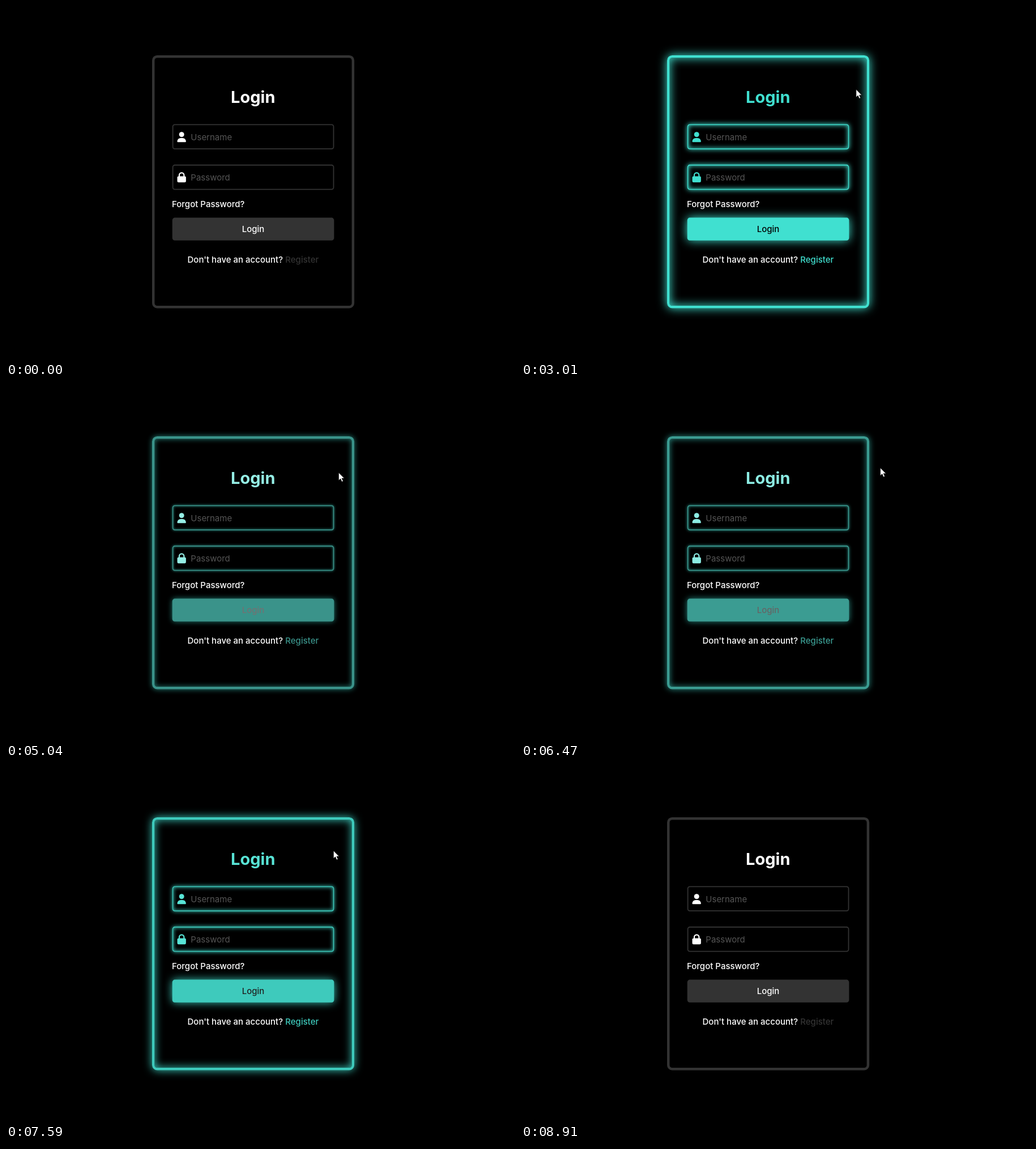
These frames come from a looping animation (899 px wide and 623 px high, 9.41 s). An HTML page:

```html
<!DOCTYPE html>
<html lang="en">
<head>
<meta charset="utf-8">
<title>Glowing login form</title>
<style>
  html, body { margin: 0; width: 100%; height: 100%; overflow: hidden; background: #000; }
  #card, #card div { position: absolute; box-sizing: border-box; }
  #card {
    left: 258px; top: 87.1px; width: 400px; height: 500px;
    transform: scale(.8929); transform-origin: 0 0;
    border: 5px solid var(--line); border-radius: 10px;
    box-shadow: 0 0 var(--wide) var(--glow), inset 0 0 var(--wide) var(--glow);
  }
  #card div { left: 35px; width: 320px; border-radius: 5px; }
  #card .field {
    height: 50px; border: 2px solid var(--line);
    box-shadow: 0 0 var(--narrow) var(--glow), inset 0 0 var(--narrow) var(--glow);
  }
  #card .button {
    top: 316px; height: 45px; background: var(--line);
    box-shadow: 0 0 var(--wide) var(--glow);
  }
  svg { position: absolute; left: 0; top: 0; }
  text { font: 500 15px Inter, sans-serif; fill: #fff; }
  .title { font-size: 29px; font-weight: 700; fill: var(--ink); }
  .hint { font-weight: 400; fill: #555; }
  .label { fill: var(--label); }
  .link { fill: var(--line); }
  .middle { text-anchor: middle; }
  .icon { fill: var(--ink); }
</style>
</head>
<body>
<div id="card">
  <div class="field" style="top:131px"></div>
  <div class="field" style="top:211px"></div>
  <div class="button"></div>
</div>
<svg width="899" height="623" viewBox="0 0 899 623">
  <text class="title middle" x="436.3" y="171">Login</text>
  <text class="hint" x="326.3" y="237">Username</text>
  <text class="hint" x="326.3" y="308">Password</text>
  <text x="293" y="354.5">Forgot Password?</text>
  <text class="label middle" x="436.5" y="399.3">Login</text>
  <text x="320.5" y="452.8">Don't have an account?</text>
  <text class="link" x="493.3" y="452.8">Register</text>

  <g class="icon">
    <circle cx="310.2" cy="226.7" r="4.5"/>
    <path d="M302.5 239.3c0-3.5 2.7-6.3 6.2-6.3h3c3.5 0 6.2 2.8 6.2 6.3q0 1-1 1h-13.4q-1 0-1-1z"/>
    <rect x="302.5" y="300.4" width="15.4" height="10.8" rx="2.2"/>
    <path d="M306 302v-3.4a4.2 4.2 0 0 1 8.4 0v3.4" fill="none" stroke="var(--ink)" stroke-width="2.2"/>
  </g>

  <path id="cursor" d="M0 0V13.6L3.2 10.7 5.5 16 7.8 15 5.5 9.9H9.8Z" fill="#fff" stroke="#000" stroke-width=".6"/>
</svg>
<script>
const LOOP = 9410, STEP = 100;
const MOVE = 780, FADE = 500;
const CARD_EDGE = 615;
const TURQUOISE = [64, 224, 208];

// Where the pointer rests, and when it sets off towards each place
const stops = [
  { start: 0, x: 857, y: 608 },
  { start: 390, x: 711, y: 320 },
  { start: 1310, x: 588, y: 146 },
  { start: 2910, x: 675, y: 161 },
  { start: 4440, x: 574, y: 151 },
  { start: 5970, x: 660, y: 142 },
  { start: 6890, x: 576, y: 146 },
  { start: 8110, x: 846, y: 623 }
];

const cursor = document.getElementById('cursor');
const root = document.documentElement.style;
const clamp = p => Math.max(0, Math.min(1, p));
const lerp = (a, b, p) => a + (b - a) * p;
const mix = (from, to, p) => `rgb(${to.map(c => lerp(from, c, p)).join()})`;
const smooth = p => p * p * (3 - 2 * p);
const inverseSmooth = v => .5 - Math.sin(Math.asin(1 - 2 * v) / 3);

// The standard CSS "ease" curve, cubic-bezier(.25, .1, .25, 1)
function ease(x) {
  const curve = (a, b, u) => 3 * a * u * (1 - u) ** 2 + 3 * b * u * u * (1 - u) + u ** 3;
  let low = 0, high = 1;
  for (let i = 0; i < 20; i++) {
    const mid = (low + high) / 2;
    if (curve(.25, .25, mid) < x) low = mid; else high = mid;
  }
  return curve(.1, 1, low);
}

// The glow follows each crossing of the card's right edge
const crossings = [];
stops.slice(1).forEach(({ start, x }, i) => {
  const share = (CARD_EDGE - stops[i].x) / (x - stops[i].x);
  if (share > 0 && share < 1) {
    crossings.push({ time: start + MOVE * inverseSmooth(share), inside: x < CARD_EDGE });
  }
});

function glowAt(t) {
  const last = crossings.filter(c => c.time <= t).pop();
  if (!last) return 0;
  const p = ease(clamp((t - last.time) / FADE));
  return last.inside ? p : 1 - p;
}

function placeCursor(t, index) {
  const to = stops[index], from = stops[Math.max(0, index - 1)];
  const p = smooth(clamp((t - to.start) / MOVE));
  const gone = index === 0 || (index === stops.length - 1 && p === 1);
  const x = lerp(from.x, to.x, p);
  const y = lerp(from.y, to.y, 1 - (1 - p) ** 2);
  cursor.style.display = gone ? 'none' : '';
  cursor.setAttribute('transform', `translate(${x} ${y})`);
}

function draw(now) {
  const time = now % LOOP;
  const index = stops.filter(s => s.start <= time).length - 1;
  const { start } = stops[index];
  const t = start + Math.floor((time - start) / STEP) * STEP;
  const p = glowAt(t);
  root.setProperty('--line', mix(51, TURQUOISE, p));
  root.setProperty('--ink', mix(255, TURQUOISE, p));
  root.setProperty('--label', mix(255, [0, 0, 0], p));
  root.setProperty('--glow', `rgba(${TURQUOISE},${p})`);
  root.setProperty('--wide', 19 * p + 'px');
  root.setProperty('--narrow', 9 * p + 'px');
  placeCursor(t, index);
}

const begin = performance.now();
function tick() {
  draw(performance.now() - begin);
  requestAnimationFrame(tick);
}
tick();
</script>
</body>
</html>
```
